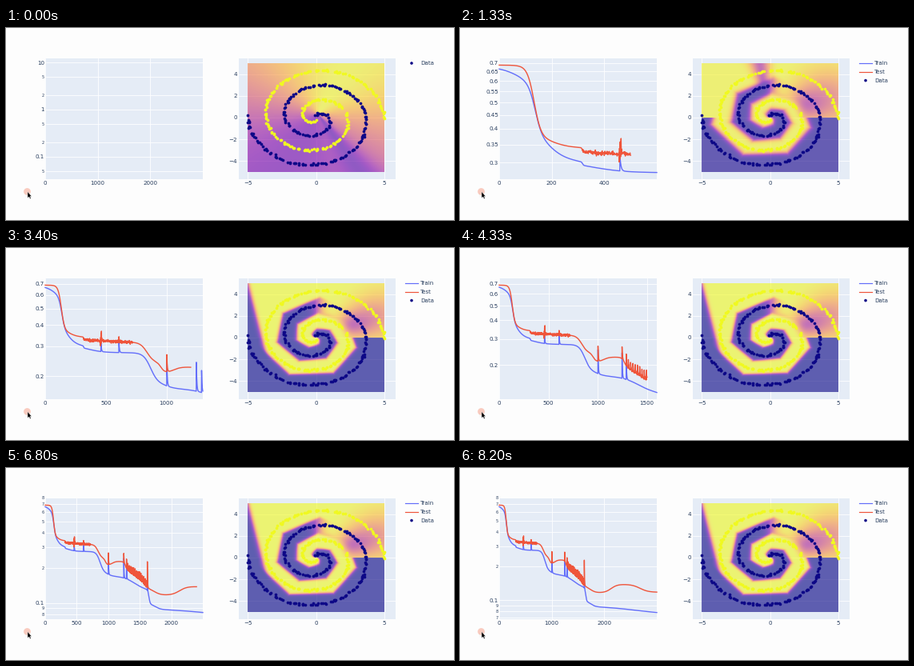
A matplotlib script that plays this animation: 560 by 240 pixels, repeating every 8270 ms.

```python
import numpy as np
import matplotlib.pyplot as plt
from matplotlib.animation import FuncAnimation
from matplotlib.patches import Circle, Polygon, Rectangle

W, H, DPI = 560, 240, 100
FRAMES, LOOP = 124, 8270
PX = 72 / DPI
INK, PANEL = "#2a3f5f", "#e5ecf6"
BLUE, RED, NAVY, YELLOW = "#636efa", "#ef553b", "#0d0887", "#f0f921"
L, R, T, B = 49, 246, 38, 189           # loss panel
EDGE = 5                                # the surface covers -5..5 on both axes
PITCH, R0 = .433, -.44                  # spiral radius: PITCH * turn + R0
END = 4 * np.pi                         # last turn angle of both spirals
plt.rcParams["font.family"] = "DejaVu Sans"

fig = plt.figure(figsize=(W / DPI, H / DPI), dpi=DPI, facecolor="#fdfdfd")
ax = fig.add_axes([0, 0, 1, 1])
ax.axis("off")
rng = np.random.default_rng(4)


def text(x, y, s, ha="center", size=7.1):
    return ax.text(x, y, s, ha=ha, va="center_baseline", color=INK,
                   fontsize=size * PX)


def line(x, y, color, width, z=2):
    return ax.plot(x, y, color=color, lw=width * PX, zorder=z,
                   solid_joinstyle="round")[0]


def sig(x):
    return 1 / (1 + np.exp(-np.clip(x, -40, 40)))


# ---- loss curves: log10 loss as a sum of smooth drops (epoch, width, size) ----
TRAIN = [(70, 40, .06), (137, 13, .18), (187, 35, .105), (317, 2, .012),
         (370, 60, .035), (870, 30, .18), (1000, 40, .03), (1420, 90, .12),
         (1645, 10, .12), (1750, 40, .04), (2600, 350, .075)]
TEST = [(133, 13, .26), (200, 35, .045), (317, 2, .016), (500, 80, .015),
        (840, 28, .12), (955, 15, .06), (1060, 30, -.035), (1275, 14, .07),
        (1400, 50, .085), (1570, 35, .08), (1740, 50, .055),
        (2130, 60, -.075), (2680, 80, .07)]
SPIKES = [(460, .05, .03), (608, .07, .03), (1003, .16, .10),
          (1247, .17, .08), (1290, .13, .08), (1620, .06, .22)]
EP = np.arange(3001)


def curve(start, drops, col):
    y = start - sum(size * sig((EP - at) / w) for at, w, size in drops)
    for spike in SPIKES:
        d = EP - spike[0]
        y += spike[col] * (d >= 0) * np.exp(-np.abs(d) / 4)
    return y


train, test = curve(-.168, TRAIN, 1), curve(-.163, TEST, 2)
noise = rng.normal(0, 1, EP.size)
test += noise * (.004 * ((EP > 315) & (EP < 720)) + .018 * (np.abs(EP - 462) < 7))
teeth = (EP > 1310) & (EP < 1615)
test += teeth * (.055 * np.exp(-(EP % 23) / 4) + .004 * noise)


def nice(v):
    base = 10 ** np.floor(np.log10(v))
    return next(base * k for k in (1, 2, 5, 10) if base * k >= v * .9999)


def log_ticks(lo, hi):
    """Value, label and label size for each tick of the log axis."""
    hi += .01
    if hi - lo < 1:
        a, b = 10 ** lo, 10 ** hi
        step = nice((b - a) / 11.5)
        ks = np.arange(np.ceil(a / step), np.floor(b / step) + 1)
        return [(k * step, f"{k * step:.4g}", 7.1) for k in ks]
    digits = (1, 2, 5) if hi - lo > 1.6 else range(1, 10)
    return [(d * 10.0 ** e, f"{10.0 ** e:g}" if d == 1 else str(d),
             7.1 if d == 1 else 5)
            for e in range(-3, 2) for d in digits
            if lo <= e + np.log10(d) <= hi]


# ---- decision surface ----
gx, gy = np.meshgrid(np.linspace(-EDGE, EDGE, 171), np.linspace(EDGE, -EDGE, 136))
rad, ang = np.hypot(gx, gy), np.arctan2(gy, gx)


def bump(x, at, width):
    return np.exp(-((x - at) / width) ** 2)


def first_field():
    a = np.arctan2(gy - .3, gx - .15)
    return .6 + .38 * np.cos(a - 1.13) - .22 * bump(a, -1.02, .2)


def learned_field(n):
    """Faceted spiral arms, with a vague fan at the upper right."""
    g = np.clip((n - 6) / 7, 0, 1)
    sector = 2 * np.pi / 7
    facet = rad * np.cos((ang + .3) % sector - sector / 2) / .965
    turn = (facet + .2 - R0) / PITCH
    phase = ang - np.pi + np.minimum(turn, END - ang % np.pi)
    v = sig(-(4 + 3 * g) * np.cos(phase))

    fan = bump(ang, .42, .5 - .12 * g) * sig(4 * (rad - 2.4))
    tone = 1 - fan * (1.05 - .13 * rad)
    v += (tone - v) * (ang > 0) * sig(12 * (1.5 - ang)) * sig(6 * (rad - 2))
    v -= .6 * (1 - g) * bump(ang, 1.72, .13) * sig(4 * (rad - 2.6)) * v
    strip = -5.2 + g * (.2 + .2 * (EDGE - gy))
    return v * (1 - g * sig(12 * (strip - gx)) * (gy > -2))


def field(n):
    w = min(1, n / 6)
    w = w * w * (3 - 2 * w)
    return first_field() * (1 - w) + learned_field(n) * w


fields = [field(n) for n in range(31)]


# ---- static parts ----
def sx(x):
    return 387.5 + 17.1 * x


def sy(y):
    return 112 - 13.6 * y


def signed(v):
    return str(v).replace("-", "\u2212")


ax.add_patch(Rectangle((L, T), R - L, B - T, fc=PANEL, zorder=0))
ax.add_patch(Rectangle((291, T), 196, B - T, fc=PANEL, zorder=0))
for v in (-5, 0, 5):
    line([sx(v)] * 2, [T, B], "white", .8, 1)
    text(sx(v), 194, signed(v))
for v in (-4, -2, 0, 2, 4):
    line([291, 487], [sy(v)] * 2, "white", .8, 1)
    text(289, sy(v), signed(v), "right")

heat = ax.imshow(fields[0], cmap="plasma", vmin=0, vmax=1, alpha=.62,
                 extent=(sx(-EDGE), sx(EDGE), sy(-EDGE), sy(EDGE)),
                 interpolation="bilinear", aspect="auto", zorder=2)
ax.set(xlim=(0, W), ylim=(H, 0))

for sign, color in ((1, NAVY), (-1, YELLOW)):
    turn = np.sqrt(np.linspace(1.4 ** 2, END ** 2, 210) + rng.normal(0, .6, 210))
    r = PITCH * turn + R0
    px = -np.cos(turn) * r + rng.normal(0, .045, turn.size)
    py = np.sin(turn) * r + rng.normal(0, .045, turn.size)
    ax.scatter(sx(sign * px), sy(sign * py), s=(3.7 * PX) ** 2, c=color,
               lw=0, zorder=4)

ax.add_patch(Circle((26.5, 204.5), 4.4, fc="#f9c3b4", alpha=.85, lw=0, zorder=5))
arrow = np.array([(0, 0), (0, 8), (1.8, 6.4), (3, 9), (4.2, 8.4), (3, 6), (5, 6)])
ax.add_patch(Polygon(arrow + (27, 204.5), fc="black", ec="white", lw=.25, zorder=6))

moving = []


def draw(i):
    while moving:
        moving.pop().remove()
    n = min(30, int(i / 4.3 + 1.7)) if i else 0
    heat.set_data(fields[n])
    end = 100 * n
    test_end = end if n == 30 else max(0, end - 100)

    if n:
        seen = np.concatenate([train[:end + 1], test[:test_end + 1]])
        pad = np.ptp(seen) / 16
        lo, hi, span = seen.min() - pad, seen.max() + pad, end
    else:
        lo, hi, span = -1.475, 1.085, 3000

    def ex(e):
        return L + (R - L) * e / span

    def ly(v):
        return B - (B - T) * (v - lo) / (hi - lo)

    for e in np.arange(0, span * .99, nice(span / 5.4)):
        moving.append(line([ex(e)] * 2, [T, B], "white", .8, 1))
        moving.append(text(ex(e), 194, f"{e:.0f}"))
    for v, label, size in log_ticks(lo, hi):
        y = ly(np.log10(v))
        if y > T:
            moving.append(line([L, R], [y, y], "white", .8, 1))
        moving.append(text(48, y, label, "right", size))

    rows = []
    for name, data, stop, color in (("Train", train, end, BLUE),
                                    ("Test", test, test_end, RED)):
        if stop:
            moving.append(line(ex(EP[:stop + 1]), ly(data[:stop + 1]), color, 1.4, 3))
            rows.append((name, color))
    for k, (name, color) in enumerate(rows + [("Data", NAVY)]):
        y = 44 + 10.8 * k
        if name == "Data":
            dot = Circle((507, y), 1.8, fc=color, lw=0, zorder=4)
            moving.append(ax.add_patch(dot))
        else:
            moving.append(line([499, 515], [y, y], color, 1.2, 3))
        moving.append(text(518, y, name, "left"))
    return moving


anim = FuncAnimation(fig, draw, frames=FRAMES, interval=LOOP / FRAMES,
                     init_func=lambda: draw(0), repeat=True, repeat_delay=0,
                     blit=False)
plt.show()
```
